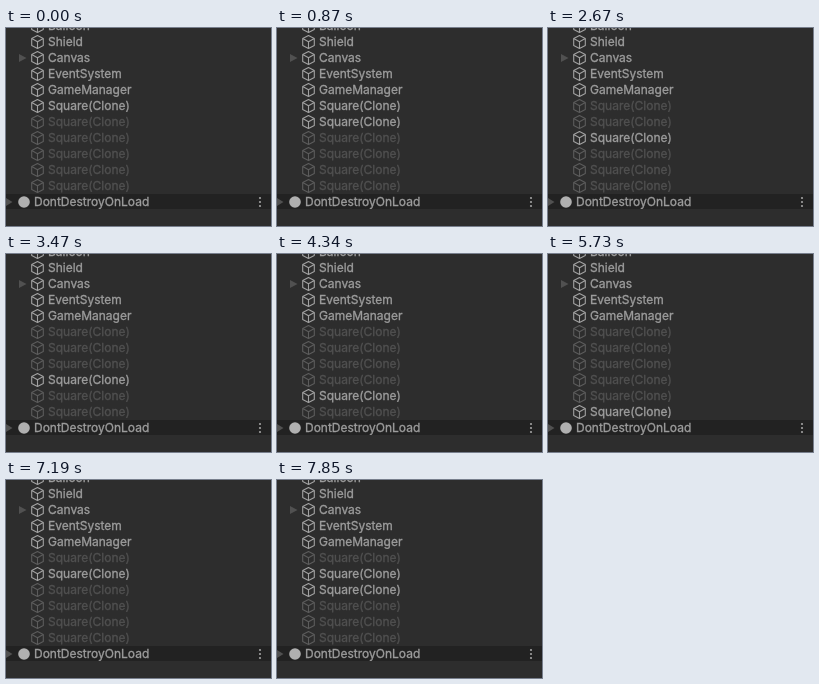
Animation of 265 by 198 pixels, one loop 8 s. Source, as an HTML page:

```html
<!DOCTYPE html>
<html lang="en">
<head>
<meta charset="utf-8">
<title>Hierarchy panel</title>
<style>
  html, body { margin: 0; width: 100%; height: 100%; overflow: hidden; background: #2d2d2d; }
  svg { display: block; width: 265px; height: 198px; }
  text { font: 12px Inter, "Liberation Sans", sans-serif; fill: #9d9d9d; stroke: #9d9d9d; stroke-width: .3; }
  .cube { fill: none; stroke: #a2a2a2; stroke-width: 1.1; stroke-linejoin: round; }
  .arrow { fill: #515151; }
  .off text { fill: #505050; stroke: #505050; }
  .off .cube { stroke: #5c5c5c; }
</style>
</head>
<body>
<svg id="panel" viewBox="0 0 265 198">
  <defs>
    <path id="cube" d="M0-6.4 5.8-3.4V3.4L0 6.4-5.8 3.4V-3.4ZM-5.8-3.4 0-.3 5.8-3.4M0-.3V6.4"/>
  </defs>
  <rect y="166" width="265" height="15" fill="#222"/>
  <path class="arrow" d="M0 170 6.5 174 0 178Z"/>
  <circle cx="18" cy="174" r="5.8" fill="#b0b0b0"/>
  <text x="28" y="178">DontDestroyOnLoad</text>
  <g fill="#a2a2a2">
    <circle cx="254" cy="170" r="1.1"/>
    <circle cx="254" cy="174" r="1.1"/>
    <circle cx="254" cy="178" r="1.1"/>
  </g>
  <path class="arrow" d="M13 26 20.5 30 13 34Z"/>
</svg>
<script>
  const LOOP = 8000, ROW = 16;
  const panel = document.getElementById("panel");
  const objects = ["Balloon", "Shield", "Canvas", "EventSystem", "GameManager"];

  // Active spans in ms for each pooled clone
  const pool = [
    [[0, 1470], [5860, 7190]],
    [[870, 2670], [6790, LOOP]],
    [[1940, 3470], [7850, LOOP]],
    [[2800, 4340]],
    [[3870, 5730]],
    [[4800, 6330]]
  ];

  function addRow(name, index) {
    const row = document.createElementNS("http://www.w3.org/2000/svg", "g");
    row.setAttribute("transform", `translate(0 ${index * ROW - 2})`);
    row.innerHTML = `<use href="#cube" class="cube" x="31.5" y="0"/><text x="42" y="4">${name}</text>`;
    panel.append(row);
    return row;
  }

  objects.forEach(addRow);
  const clones = pool.map((_, i) => addRow("Square(Clone)", objects.length + i));

  function draw(now) {
    const t = now % LOOP;
    clones.forEach((row, i) => {
      const active = pool[i].some(([on, off]) => t >= on && t < off);
      row.classList.toggle("off", !active);
    });
  }

  const start = performance.now();
  function tick() {
    draw(performance.now() - start);
    requestAnimationFrame(tick);
  }
  draw(0);
  requestAnimationFrame(tick);
</script>
</body>
</html>
```
